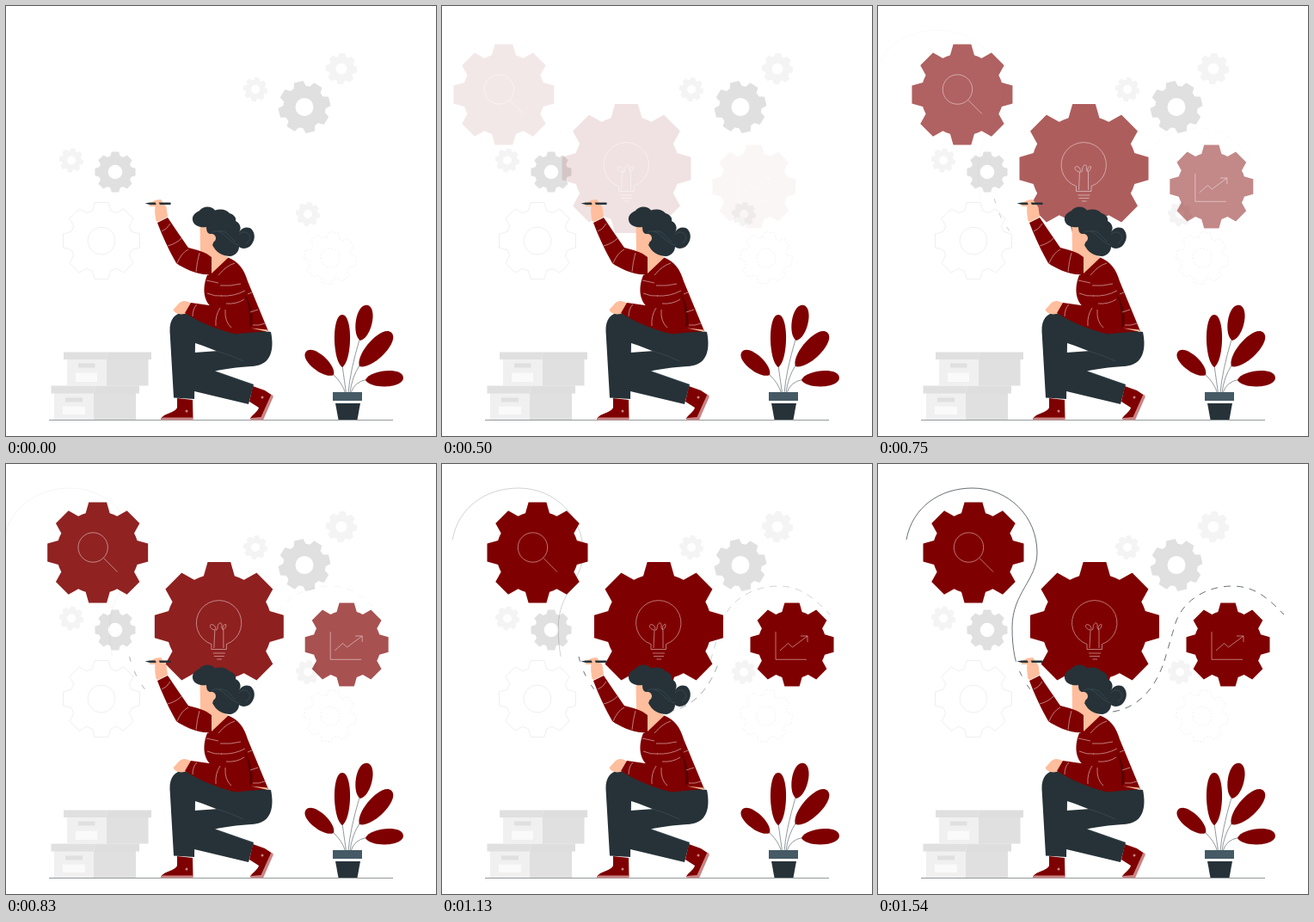
Write an HTML page that moves like this. It is 500 px wide and 500 px high and loops after 1.58 s.

```html
<!DOCTYPE html>
<html lang="en">
<head>
<meta charset="utf-8">
<title>Gears</title>
<style>
html, body { margin: 0; width: 100%; height: 100%; overflow: hidden; background: #fff; }
svg { display: block; width: 100%; height: 100%; }
.red { fill: #7f0000; }
.dark { fill: #263238; }
.skin { fill: #ffbe9d; }
.sole { fill: #c98585; }
.line { fill: none; stroke: #263238; stroke-width: .7; }
.icon { fill: none; stroke: #e6c4c4; stroke-width: .6; stroke-linejoin: round; }
.knit { fill: none; stroke: #ecd0d0; stroke-width: .6; }
.seam { fill: none; stroke: #455a64; stroke-width: .5; }
</style>
</head>
<body>
<svg viewBox="0 0 500 500">
  <g id="backdrop"></g>

  <g id="boxes">
    <path fill="#f0f0f0" d="M71 411H117V441H71ZM56 450H103V481H56Z"/>
    <path fill="#e0e0e0" d="M117 411H165.500V441.500H117ZM102 450H151V481H102Z"/>
    <path fill="#e0e0e0" d="M67 402.500H118L116 411H67ZM52.500 441.500H104L102 450.500H52.500Z"/>
    <path fill="#dedede" d="M118 402.500H169V411H116ZM104 441.500H155V450.500H102Z"/>
    <path fill="#e0e0e0" d="M84 415.500H103.500V420.500H84ZM69 455.500H89V460.500H69Z"/>
    <path fill="#fafafa" d="M81 426.500H106V437H81ZM66 465.500H92V475H66Z"/>
  </g>

  <path class="line" style="stroke-width:.5" d="M50 481.500H450"/>

  <g id="trail">
    <path class="line" d="M33 88C40 50 72 28 110 28C152 28 185 61 185 103C185 135 156 150 156 190C156 203 157 214 159 224"/>
    <path class="line" stroke-dasharray="8 7" d="M333 229C338 212 340 205 345 188C352 162 378 142 412 142C440 142 455 158 472 175"/>
  </g>
  <path id="bend" class="line" stroke-dasharray="8 7" d="M258 289C300 290 322 262 333 229"/>
  <path id="tail" class="line" stroke-dasharray="6 12" d="M159 224C162 238 170 255 182 268"/>

  <g id="search">
    <g class="icon"><circle cx="105.500" cy="97" r="17.200"/><path d="M118 109.500L134 125.500"/></g>
  </g>
  <g id="idea">
    <g class="icon">
      <path d="M243 215.500V209.500A26.200 26.200 0 1 1 260.500 209.500V215.500Z"/>
      <path d="M246 214L247 193C240 192 240 185 245 187C250 189 246 196 250 192C250 183 256 183 255 189C255 194 259 193 260 188C261 184 254 188 257 194L257 214"/>
      <path d="M245 220H259M246 223.500H258M249.500 227H255"/>
    </g>
  </g>
  <g id="chart">
    <path class="icon" d="M388 195V227.300H424M393 217L402.500 208.500L407.500 213L425 200M417 200H425V207"/>
  </g>

  <g id="plant">
    <path class="line" style="stroke-width:.5" d="M391 418L395.500 450M411 388Q400 425 398 450M411 418Q402 432 400 450M380 428Q391 438 394.500 450M419 434.500Q405 437 401 450"/>
    <path fill="#455a64" d="M380 449H414V459H380Z"/>
    <path class="dark" d="M383 462H412L408.500 481H386.500Z"/>
  </g>

  <g id="person">
    <path class="red" d="M199 456L217 458L217.500 480H180C184 473 197 473 199 467Z"/>
    <path class="sole" d="M180 480Q181 478 184 478.500H217.500V481.500H180Z"/>
    <path class="red" d="M287 442L301 447L310 453L298 480H284C285 476 293 472 294 467L283 460Z"/>
    <path class="sole" d="M308.500 451.500L311 454L299 481.500H284L285 479L296.500 478Z"/>
    <g class="sole"><circle cx="210" cy="471" r="1.500"/><circle cx="298" cy="455" r="1.500"/></g>

    <path class="dark" d="M219 403L247 401L306 390C307 410 299 418 285 419C268 420 255 422 243 424.500L288 440L282 463L219 448Z"/>
    <path class="dark" d="M190.500 378C190 362 199 355 210 357.500L262 372L308 379C312 398 309 418 287 418.500C283 418.500 280 418 276 416C262 409 245 400 220 392L219 457L195 455.500Z"/>
    <path class="seam" d="M246 401.500Q262 406 276 413M243 424.500L286 440"/>

    <path class="skin" d="M225.500 255H241L247 284L259 293L239 312L238 291L226 287Z"/>
    <path class="red" d="M258.500 292.500C270 297 277 306 281 320L305 378L270 381C252 376 242 362 240 351C228 342 229 325 234 313L239 311Z"/>
    <path class="skin" d="M285 374.500L304 376.500L305 379Z"/>
    <path class="red" d="M176 252L188 246C196 258 206 272 212 281C222 283.500 232 286 239 292L239 312C225 314 206 305 198 299C190 285 182 268 176 252Z"/>
    <path class="skin" d="M216 346C209 342 204 342 200 347L194.500 353C196 358 204 360 210 357Z"/>
    <path class="red" d="M215 345L208 357C225 368 250 378 268 381.500C281 380 286 370 281 345L250 350Z"/>
    <path fill="#550000" d="M277 333C284 345 288 357 286 371L283 374C284 360 282 346 277 333Z"/>
    <path class="knit" d="M181 262Q187 260 191 253M188 279Q199 276 205 269M199 299Q204 287 212 283M221 309Q222 297 225 287M247 313Q256 302 266 299M233 319L247 322M249 325Q261 326 273 323M234 334Q243 338 251 337M256 346Q268 347 277 341M222 347Q217 352 217 361M249 351Q243 360 244 372M250 337Q265 338 278 331M255 353Q254 367 262 374M281 335L286 333M284 356L293 353M287 371Q294 372 301 369"/>

    <path class="dark" d="M217 249C216 243 221 240 225 238C229 232 239 232 243 237.500C250 235 257 237 260 241C266 243 268 247 267 250C273 253 274 259 271 263C275 257 282 256 286 260C291 266 289 275 283 280C278 283 273 282 271 280C271 285 267 290 261 291C251 291 244 286 240 278C243 272 243 266 238 265C235 265 233 263 233 257C227 258 218 256 217 249Z"/>
    <circle class="skin" cx="239" cy="270" r="5"/>
    <path class="seam" d="M238 264C251 255 258 276 271 278M247 262C258 260 261 271 267 274M271 266C279 257 290 270 279 276"/>

    <path class="skin" d="M174.500 250C173 241 173 237 173.500 233L167 233C167 228 173 225 180 225L186.500 234L188 245L176.500 251Z"/>
    <path class="dark" d="M161.500 229.600L167 228.400H190.500A1.300 1.300 0 0 1 190.500 231H167Z"/>
    <path class="skin" d="M173 226L177 226.500L180 234L176 235Z"/>
  </g>
</svg>
<script>
const NS = "http://www.w3.org/2000/svg";
const LOOP = 1580, FPS = 24, SHIFT = 50;
const get = id => document.getElementById(id);

function add(parent, tag, attrs, first) {
  const el = document.createElementNS(NS, tag);
  for (const key in attrs) el.setAttribute(key, attrs[key]);
  parent.insertBefore(el, first ? parent.firstChild : null);
  return el;
}

// Eight trapezoid teeth joined by arcs, with an optional round hole.
function gearPath(cx, cy, r, hole = 0, turn = 0) {
  const body = r * .82;
  let d = "";
  for (let i = 0; i < 8; i++) {
    const a = (i * 45 + turn) * Math.PI / 180;
    const at = (side, up) =>
      (cx + side * Math.cos(a) + up * Math.sin(a)).toFixed(2) + " " +
      (cy + side * Math.sin(a) - up * Math.cos(a)).toFixed(2);
    const base = r * .24, top = r * .178;
    const foot = Math.sqrt(body * body - base * base);
    d += (i ? `A${body} ${body} 0 0 1 ` : "M") + at(-base, foot) +
      "L" + at(-top, r) + "L" + at(top, r) + "L" + at(base, foot);
    if (i === 7) d += `A${body} ${body} 0 0 1 ` + d.slice(1, d.indexOf("L")) + "Z";
  }
  if (hole) d += `M${cx - hole} ${cy}a${hole} ${hole} 0 1 0 ${2 * hole} 0a${hole} ${hole} 0 1 0 ${-2 * hole} 0Z`;
  return d;
}

const backdrop = get("backdrop");
[
  [76, 179.5, 14, 5, 8, "#f4f4f4"],
  [290, 97, 14, 5, 8, "#f4f4f4"],
  [390, 73, 18, 6.5, 4, "#f4f4f4"],
  [351, 242, 14, 5, 8, "#f4f4f4"],
  [127, 193, 23.5, 8.3, 0, "#e0e0e0"],
  [347, 117.5, 30, 10.5, -13, "#e0e0e0"]
].forEach(([x, y, r, hole, turn, fill]) =>
  add(backdrop, "path", { d: gearPath(x, y, r, hole, turn), fill, "fill-rule": "evenodd" }));

[[111, 273, 44.5, 16, 0, "#dedede", "none"], [377, 293, 30, 11, 8, "#e2e2e2", "2 2"]]
  .forEach(([x, y, r, hole, turn, stroke, dash]) =>
    add(backdrop, "path", {
      d: gearPath(x, y, r, hole, turn), fill: "none", stroke,
      "stroke-width": .5, "stroke-dasharray": dash
    }));

[["search", 111, 103, 58.5], ["idea", 252, 189, 75], ["chart", 407, 210, 48.5]]
  .forEach(([id, x, y, r]) => add(get(id), "path", { d: gearPath(x, y, r), class: "red" }, true));

// Leaves grow from their base point: x, y, length, width, angle.
[[391, 420, 61, 10.5, 0], [412, 389, 42, 11, 11], [411, 419, 54, 12.5, 43.5],
 [381, 429, 42, 10.5, -50], [418, 435, 44, 10.5, 86]]
  .forEach(([x, y, len, w, turn]) => add(get("plant"), "path", {
    class: "red",
    transform: `translate(${x} ${y}) rotate(${turn})`,
    d: `M0 0C${-1.1 * w} ${-.12 * len} ${-1.2 * w} ${-len} 0 ${-len}C${1.2 * w} ${-len} ${1.1 * w} ${-.12 * len} 0 0Z`
  }));

// Each part slides in from the left: id, first step, number of steps, fade power.
const parts = [
  ["idea", 9, 12, 1.6], ["search", 9.5, 11.5, 1.6], ["chart", 10.6, 12, 1.6],
  ["tail", 11.7, 12, 1.6], ["bend", 16, 14, 2.2], ["trail", 13, 24, 2.2]
].map(([id, from, span, power]) => ({ el: get(id), from, span, power }));

function draw(ms) {
  const step = Math.floor((ms % LOOP + 4) * FPS / 1000);
  for (const { el, from, span, power } of parts) {
    const p = Math.min(1, Math.max(0, (step - from) / span));
    el.setAttribute("transform", `translate(${(p - 1) * SHIFT} 0)`);
    el.setAttribute("opacity", p ** power);
  }
}

const start = performance.now();
function tick() {
  draw(performance.now() - start);
  requestAnimationFrame(tick);
}
tick();
</script>
</body>
</html>
```
